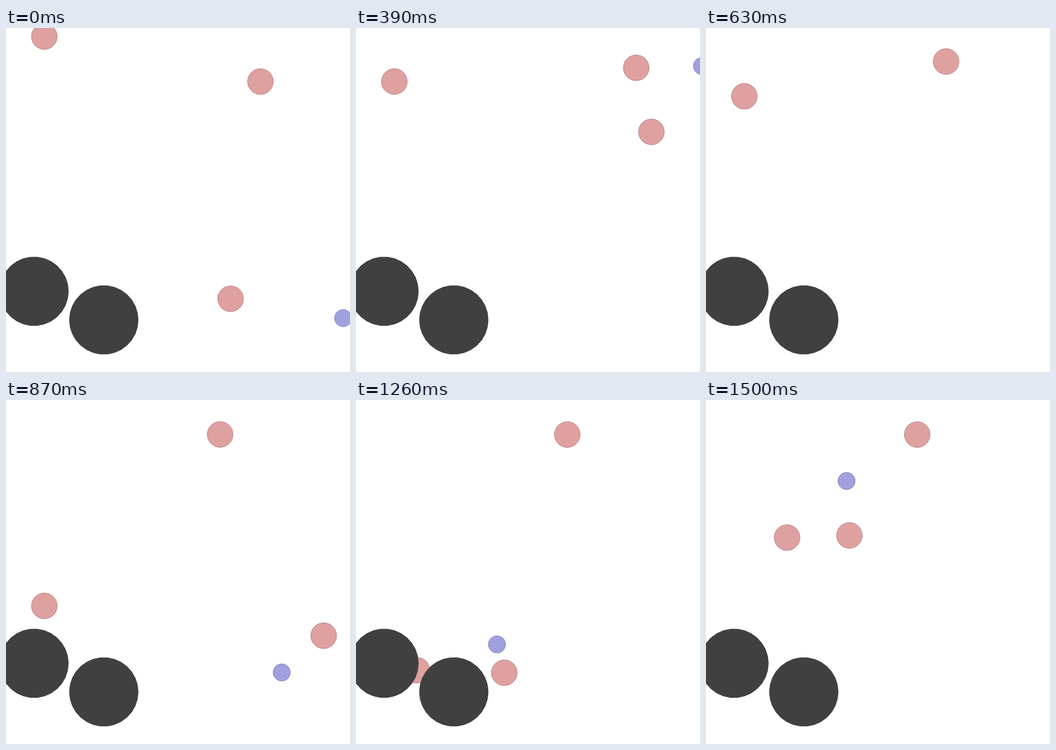
Write an HTML page that moves like this. It is 700 px wide and 700 px high and loops after 1530 ms.

```html
<!DOCTYPE html>
<html lang="en">
<head>
<meta charset="utf-8">
<title>Pursuit</title>
<style>
  html, body { margin: 0; width: 100%; height: 100%; overflow: hidden; background: #fff; }
  svg { display: block; width: 100vw; height: 100vh; }
</style>
</head>
<body>
<svg id="stage" viewBox="0 0 700 700"></svg>
<script>
const STEP = 30, STEPS = 51, DRAG = 0.75;
const stage = document.getElementById('stage');

// Each disc is a 30-sided polygon around its own centre.
function disc(r, fill, stroke) {
  const el = document.createElementNS('http://www.w3.org/2000/svg', 'polygon');
  const pts = Array.from({ length: 30 }, (_, i) => {
    const a = i * Math.PI / 15;
    return (r * Math.cos(a)).toFixed(2) + ',' + (r * Math.sin(a)).toFixed(2);
  });
  el.setAttribute('points', pts.join(' '));
  el.setAttribute('fill', fill);
  el.setAttribute('stroke', stroke);
  stage.appendChild(el);
  return el;
}

const red = () => disc(26.25, '#dfa0a0', '#b57c7c');
const blue = () => disc(17.5, '#a0a0df', '#7c7cb5');
const dark = () => disc(70, '#404040', '#3e3e3e');

const place = (el, [x, y]) =>
  el.setAttribute('transform', `translate(${x.toFixed(2)} ${y.toFixed(2)})`);

// A turning point: step, position and velocity in pixels per step.
const key = (n, x, y, vx, vy) => ({ n, p: [x, y], v: [vx, vy] });

// Cubic motion that meets the position and velocity of each turning point.
function steer(keys, n) {
  const i = Math.max(1, keys.findIndex(k => k.n >= n));
  const a = keys[i - 1], b = keys[i];
  const d = b.n - a.n, u = (n - a.n) / d, w = 1 - u;
  return [0, 1].map(k =>
    w * w * ((1 + 2 * u) * a.p[k] + u * d * a.v[k]) +
    u * u * ((1 + 2 * w) * b.p[k] - w * d * b.v[k]));
}

// Without thrust, drag takes a fixed share of the speed at every step.
function coast(from, n) {
  const reach = (1 - DRAG ** (n - from.n)) * DRAG / (1 - DRAG);
  return from.p.map((p, k) => p + from.v[k] * reach);
}

const diver = [
  key(0, 78, 17.4, 0, 18),
  key(8, 78, 249, 0, 0),
  key(13, 78, 109, 0, -35),
  key(16.5, 78, 19, 0, 0),
  key(21, 78, 139, 0, 35),
  key(30, 78, 454, 0, 35),
  key(34, 110, 495, 0, 8),
  key(37, 102, 540, 0, 15),
  key(42, 124, 550, 14, -27),
  key(50, 165, 280, 1, -35)
];

const chaser = [
  key(0, 457, 551, 0, 0),
  key(13, 601, 211.4, 18, -20),
  key(21, 735, 246, 8, 33),
  key(29, 646.4, 479.6, -34, 2),
  key(34, 471.6, 483.6, -16, 14),
  key(42, 301.7, 555, -9, -33),
  key(50, 291.8, 275.6, 0, -35)
];

const runner = [
  key(0, 686, 590.4, 0, -18),
  key(13, 704, 77.4, 5, -33),
  key(21, 722, 250, 1, 45),
  key(29, 561, 554.4, -38, 22),
  key(34, 371.4, 596, -30, 16),
  key(37.5, 298, 671, -7, 0),
  key(42, 286.8, 497.4, 0, -45),
  key(50, 286, 164.8, 0, -38)
];

const drifter = [
  key(0, 517.8, 109, 0, 0),
  key(13, 570.2, 81, 2, -4),
  key(21, 488.6, 68.2, -19.6, 0.7)
];
const release = drifter[2];

const movers = [
  [red(), n => steer(diver, n)],
  [red(), n => n < release.n ? steer(drifter, n) : coast(release, n)],
  [red(), n => steer(chaser, n)],
  [blue(), n => steer(runner, n)]
];

place(dark(), [57, 535.8]);
place(dark(), [199, 594]);

function draw(ms) {
  const n = Math.floor(ms / STEP) % STEPS;
  movers.forEach(([el, path]) => place(el, path(n)));
}

const start = performance.now();
function tick() {
  draw(performance.now() - start);
  requestAnimationFrame(tick);
}
tick();
</script>
</body>
</html>
```
